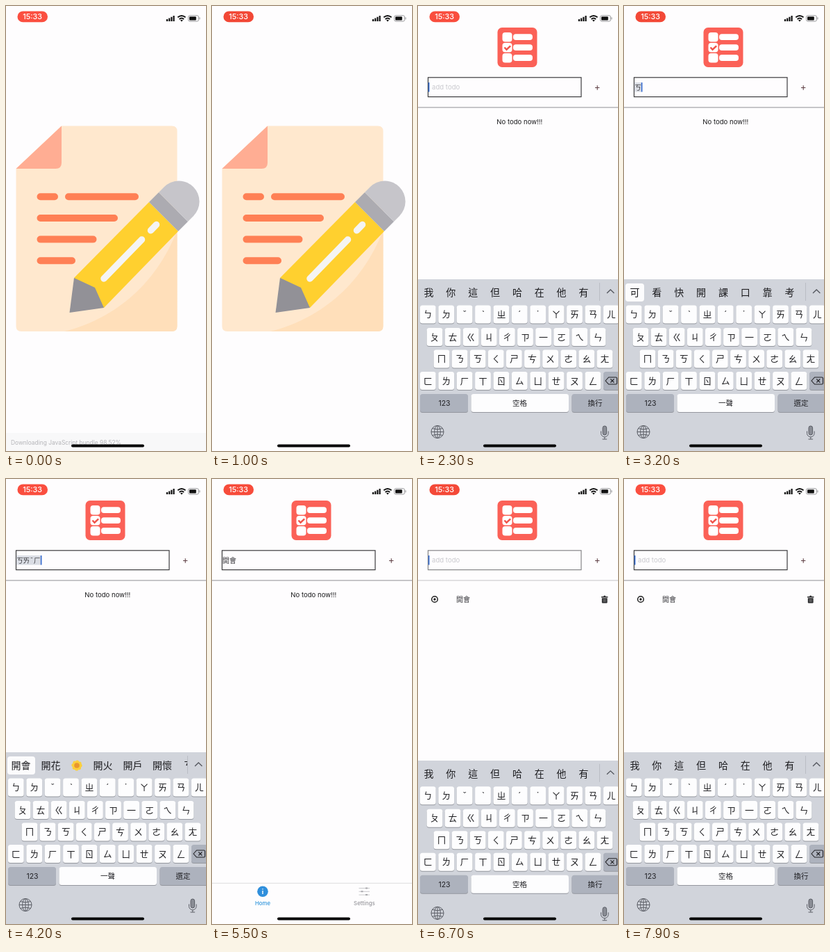
Recreate the animation shown at these times as an HTML page. Size 288 by 640 pixels, loop 8000 ms.

```html
<!DOCTYPE html>
<html lang="zh-Hant">
<head>
<meta charset="utf-8">
<title>Todo app</title>
<style>
html, body { margin: 0; width: 100%; height: 100%; overflow: hidden; background: #fefdfe; }
svg { display: block; width: 288px; height: 640px; }
text { font-family: Inter, "Noto Sans CJK TC", "Noto Sans CJK", sans-serif; }
.mid { text-anchor: middle; }
.ui { font-size: 9.6px; }
.tab { font-size: 7.8px; font-weight: 500; text-anchor: middle; }
.key { font-size: 13px; text-anchor: middle; fill: #1d1d20; }
.word { font-size: 14px; text-anchor: middle; fill: #1d1d20; }
.label { font-size: 10.5px; text-anchor: middle; fill: #222226; }
.zh { font-size: 10px; fill: #3a3a3e; }

#splash { animation: splash 8s linear infinite; }
#board { animation: board 8s infinite; }
#caret { animation: caret 8s step-end infinite; }
#plus { animation: tap 8s linear infinite; }
#pill { animation: pulse 2s ease-in-out infinite; }
#field { animation: field 8s linear infinite; }
#rule { animation: rule 8s linear infinite; }

@keyframes splash { 0%, 13.75% { opacity: 1 } 15.6%, 100% { opacity: 0 } }
@keyframes board {
  0% { transform: translateY(247px) }
  23.5% { transform: translateY(247px); animation-timing-function: ease }
  28.5% { transform: none }
  64.5% { transform: none; animation-timing-function: ease }
  68.5% { transform: translateY(247px) }
  80.125% { transform: translateY(247px); animation-timing-function: ease }
  85.125%, 100% { transform: none }
}
@keyframes caret {
  0% { transform: none }
  36.25% { transform: translateX(10px) }
  41.25% { transform: translateX(19px) }
  46.25% { transform: translateX(25px) }
  50% { transform: translateX(35px) }
  56.25% { transform: translateX(21px) }
  75%, 100% { transform: none }
}
@keyframes tap { 0%, 73% { opacity: 1 } 74.5% { opacity: .25 } 78%, 100% { opacity: 1 } }
@keyframes pulse { 0%, 100% { fill: #fb4f40 } 50% { fill: #f24836 } }
@keyframes field { 0%, 75% { stroke: #3c3c3e } 77%, 85% { stroke: #858588 } 87%, 100% { stroke: #3c3c3e } }
@keyframes rule { 0%, 75% { stroke: #a5a5a8 } 77%, 85% { stroke: #cfcfd2 } 87%, 100% { stroke: #a5a5a8 } }
</style>
</head>
<body>
<svg viewBox="0 0 288 640">
  <defs><clipPath id="strip"><rect y="393" width="261" height="37"/></clipPath></defs>
  <rect width="288" height="640" fill="#fefdfe"/>

  <g id="home">
    <rect x="114.5" y="31" width="57" height="57" rx="6.5" fill="#fb6157"/>
    <g fill="#fff">
      <rect x="121.5" y="38" width="14" height="13.5" rx="4"/>
      <rect x="121.5" y="53" width="14" height="13.5" rx="4"/>
      <rect x="121.5" y="68" width="14" height="13.5" rx="4"/>
      <rect x="137" y="40.3" width="28" height="8.8" rx="4"/>
      <rect x="137" y="55.2" width="28" height="8.8" rx="4"/>
      <rect x="137" y="70.1" width="28" height="8.8" rx="4"/>
    </g>
    <path d="M124.5 59.5l3 3.2 5.7-5.4" fill="none" stroke="#f0544a" stroke-width="2.4"/>

    <rect id="field" x="14.5" y="102.8" width="220.5" height="27.8" fill="none" stroke-width="1.2"/>
    <text class="ui" x="20" y="120.3" fill="#c9c9ce" data-on="0-2900,6000-8000">add todo</text>
    <g id="marked"></g>
    <text class="zh" x="15" y="120.5" data-on="4500-6000">開會</text>
    <g id="caret"><rect x="14.8" y="110" width="1.7" height="13.5" fill="#3a6fd0"
      data-on="1950-2700,3000-4700,4950-5160,6400-7100,7350-8000"/></g>
    <path id="plus" d="M255 117.5h6.4M258.2 114.3v6.4" stroke="#5f3f45" stroke-width="1.1"/>
    <path id="rule" d="M0 145.8H288" stroke-width="1.2"/>

    <text class="ui mid" x="146.3" y="169.5" fill="#1c1c1e" data-on="0-6000">No todo now!!!</text>
    <g data-on="6000-8000">
      <circle cx="24" cy="173" r="4.3" fill="none" stroke="#222" stroke-width="1.5"/>
      <circle cx="24" cy="173" r="1.7" fill="#222"/>
      <text class="zh" x="55" y="176.6">開會</text>
      <path d="M264 169h3l.7-1.2h2l.7 1.2h3v1.4H264zM264.8 171.2h7.8v6.2q0 1-1 1h-5.8q-1 0-1-1z" fill="#2b2b2d"/>
      <path d="M267.2 172.5v4.5M268.7 172.5v4.5M270.2 172.5v4.5" stroke="#bbb" stroke-width=".5"/>
    </g>

    <path d="M0 581.3H288" stroke="#dcdcde"/>
    <circle cx="73" cy="593.3" r="7.8" fill="#2f8fdc"/>
    <path d="M73 592v5M73 589.2v1.4" stroke="#fff" stroke-width="1.4"/>
    <text class="tab" x="73" y="612.5" fill="#2f95dc">Home</text>
    <path d="M211.5 588.5h15.5M211.5 593.3h15.5M211.5 598.1h15.5" stroke="#c9c9cc"/>
    <path d="M221 588.5h3M214.5 593.3h3M221 598.1h3" stroke="#a9a9ad" stroke-width="2"/>
    <text class="tab" x="219.4" y="612.5" fill="#97979c">Settings</text>
  </g>

  <g id="board">
    <rect y="393" width="288" height="250" fill="#d1d4db"/>
    <g id="words" clip-path="url(#strip)"></g>
    <path d="M261.5 398v26" stroke="#b9bcc4"/>
    <path d="M272 413l5.2-5 5.2 5" fill="none" stroke="#54575e" stroke-width="1.3"/>
    <g id="keys"></g>
    <path d="M270 539l4.5-5h10.5q1.5 0 1.5 1.5v7q0 1.5-1.5 1.5h-10.5zM277.3 536.5l5 5M282.3 536.5l-5 5" fill="none" stroke="#222226" stroke-width="1.1"/>
    <text class="label" x="38" y="575">123</text>
    <g data-on="0-2900,4500-8000">
      <text class="label" x="146.5" y="575">空格</text><text class="label" x="255" y="575">換行</text>
    </g>
    <g data-on="2900-4500">
      <text class="label" x="146.5" y="575">一聲</text><text class="label" x="255" y="575">選定</text>
    </g>
    <g fill="none" stroke="#5a5d65" stroke-width="1">
      <circle cx="28" cy="612.5" r="9"/>
      <ellipse cx="28" cy="612.5" rx="4.3" ry="9"/>
      <path d="M19 612.5h18M28 603.5v18M20.7 607.5q7.3 3 14.6 0M20.7 617.5q7.3-3 14.6 0"/>
      <path d="M263.5 611.5v3a5.3 5.3 0 0 0 10.6 0v-3M268.8 620v3M265.5 623h6.6"/>
      <rect x="266" y="604" width="5.6" height="13" rx="2.8" fill="#8a8d95"/>
    </g>
  </g>

  <g id="splash">
    <rect width="288" height="640" fill="#fefdfe"/>
    <path d="M80 172.5H239q7.5 0 7.5 7.5V460.5q0 7.5-7.5 7.5H22q-7.5 0-7.5-7.5V234z" fill="#ffe8ce"/>
    <path d="M84 468C150 452 215 405 246.5 322V460.5q0 7.5-7.5 7.5z" fill="#ffdfba"/>
    <path d="M80 172.5V225.5q0 8.500-8.500 8.500H14.500z" fill="#ffad93"/>
    <path d="M49.500 274.300H70M90 274.300H186M49.500 305H156M49.500 335.600H125.500M49.500 366.200H95" stroke="#ff8055" stroke-width="10" stroke-linecap="round"/>
    <path d="M206 282L248 324 141 434 98 391z" fill="#ffd02f"/>
    <path d="M206 282L220 268 262 310 248 324z" fill="#acabb1"/>
    <path d="M220 268L228 260A29.700 29.700 0 0 1 270 302L262 310z" fill="#c6c5ca"/>
    <path d="M216.500 314.500L208.500 322.800M195.500 336L141 392" stroke="#f5f4f3" stroke-width="9.500" stroke-linecap="round"/>
    <path d="M98 391L128 405 141 434 91.500 441z" fill="#929197"/>
    <g data-on="0-1000">
      <rect y="614" width="288" height="26" fill="#f8f8f9"/>
      <text x="7" y="631" font-size="8.4" fill="#b4b4b8">Downloading JavaScript bundle
        <tspan data-on="0-300">98.52%</tspan></text>
      <text x="134.500" y="631" font-size="8.4" fill="#b4b4b8" data-on="300-1000">100.00%</text>
    </g>
  </g>

  <g id="status">
    <rect id="pill" x="16.500" y="7.500" width="43.500" height="15.800" rx="7.900"/>
    <text class="mid" x="38.200" y="19.300" font-size="10.800" font-weight="500" fill="#fff">15:33</text>
    <path d="M232 22v-3M235.200 22v-4.500M238.400 22v-6.300M241.600 22v-8" stroke="#111" stroke-width="2.200"/>
    <g fill="none" stroke="#111" stroke-width="1.900">
      <path d="M247.300 16.300q5.600-4.600 11.200 0M249.600 18.900q3.300-2.600 6.600 0"/>
    </g>
    <path d="M251 20.500q1.900-1.400 3.800 0L252.900 22.500z" fill="#111"/>
    <rect x="262.500" y="13.700" width="15" height="8.300" rx="2.300" fill="none" stroke="#9a9a9d"/>
    <rect x="264" y="15.200" width="9.800" height="5.300" rx="1" fill="#111"/>
    <path d="M279 16.300v3" stroke="#9a9a9d"/>
  </g>
  <rect x="94" y="630.500" width="105" height="4" rx="2" fill="#050505"/>
</svg>

<script>
const LOOP = 8000;
const fill = (id, html) => { document.getElementById(id).innerHTML = html; };

// Keyboard
const cap = (x, y, w, color = '#fdfdfe') =>
  `<rect x="${x}" y="${y + 1}" width="${w}" height="26" rx="3.5" fill="#94979e"/>` +
  `<rect x="${x}" y="${y}" width="${w}" height="26" rx="3.5" fill="${color}"/>`;
const rows = [
  ['ㄅㄉˇˋㄓˊ˙ㄚㄞㄢㄦ', 14.3, 430.5],
  ['ㄆㄊㄍㄐㄔㄗㄧㄛㄟㄣ', 24, 463],
  ['ㄇㄋㄎㄑㄕㄘㄨㄜㄠㄤ', 34, 494.5],
  ['ㄈㄌㄏㄒㄖㄙㄩㄝㄡㄥ', 14.3, 526]
];
let keys = '';
for (const [chars, start, y] of rows) {
  const pitch = start < 20 ? 26.4 : 26.1;
  [...chars].forEach((c, i) => {
    const x = start + i * pitch;
    const glyph = c === 'ㄧ' ? '一' : c;
    keys += cap(x - 11.4, y, 22.8) + `<text class="key" x="${x}" y="${y + 17.7}">${glyph}</text>`;
  });
}
const gray = '#adb2bd';
keys += cap(267, 526, 24, gray) + cap(3, 558, 69, gray) + cap(76.5, 558, 140.5) + cap(221.5, 558, 70, gray);
fill('keys', keys);

// Suggestion strip
const word = (w, x) => `<text class="word" x="${x}" y="417">${w}</text>`;
const spread = chars => [...chars].map((c, i) => word(c, 15.5 + i * 31.85)).join('');
const chosen = w => `<rect x="2" y="399" width="${w}" height="26" rx="4" fill="#fcfcfd"/>`;
const flower =
  '<circle cx="102" cy="412" r="5" fill="none" stroke="#fbcf3c" stroke-width="5.2" stroke-linecap="round" stroke-dasharray="0 3.927"/>' +
  '<circle cx="102" cy="412" r="3.8" fill="#e9962f"/>';
const phrases = chosen(40) + word('開會', 21.5) + word('開花', 64.5) + flower +
  word('開火', 139.5) + word('開戶', 182.5) + word('開懷', 225) + word('ㄎ', 263);
const strips = [
  ['0-2900,6000-8000', spread('我你這但哈在他有')],
  ['2900-3300', chosen(27) + spread('可看快開課口靠考')],
  ['3300-4000', chosen(27) + spread('開揩凱快塊慨楷會')],
  ['4000-4500', phrases],
  ['4500-6000', spread('的了時中前後嗎吧')]
];
fill('words', strips.map(([on, body]) => `<g data-on="${on}">${body}</g>`).join(''));

// Syllables being composed
const spots = [20.3, 29.3, 37, 44.8];
const steps = [['2900-3300', 10], ['3300-3700', 19], ['3700-4000', 25], ['4000-4500', 35]];
fill('marked', steps.map(([on, w], n) =>
  `<g data-on="${on}"><rect x="15" y="110" width="${w}" height="13.5" fill="#dadde4"/>` +
  [...'ㄎㄞˉㄏ'].slice(0, n + 1).map((c, i) =>
    `<text class="zh mid" x="${spots[i]}" y="120.5">${c}</text>`).join('') + '</g>'
).join(''));

// Turn data-on time spans into stepped visibility keyframes
let css = '';
document.querySelectorAll('[data-on]').forEach((el, i) => {
  const at = (ms, v) => `${ms / LOOP * 100}%{visibility:${v}}`;
  const spans = el.dataset.on.split(',').map(s => s.split('-'));
  css += `@keyframes on${i}{${at(0, 'hidden')}` +
    spans.map(([a, b]) => at(a, 'visible') + at(b, 'hidden')).join('') + '}';
  el.style.animation = `on${i} ${LOOP}ms step-end infinite`;
});
document.head.appendChild(document.createElement('style')).textContent = css;
</script>
</body>
</html>
```
